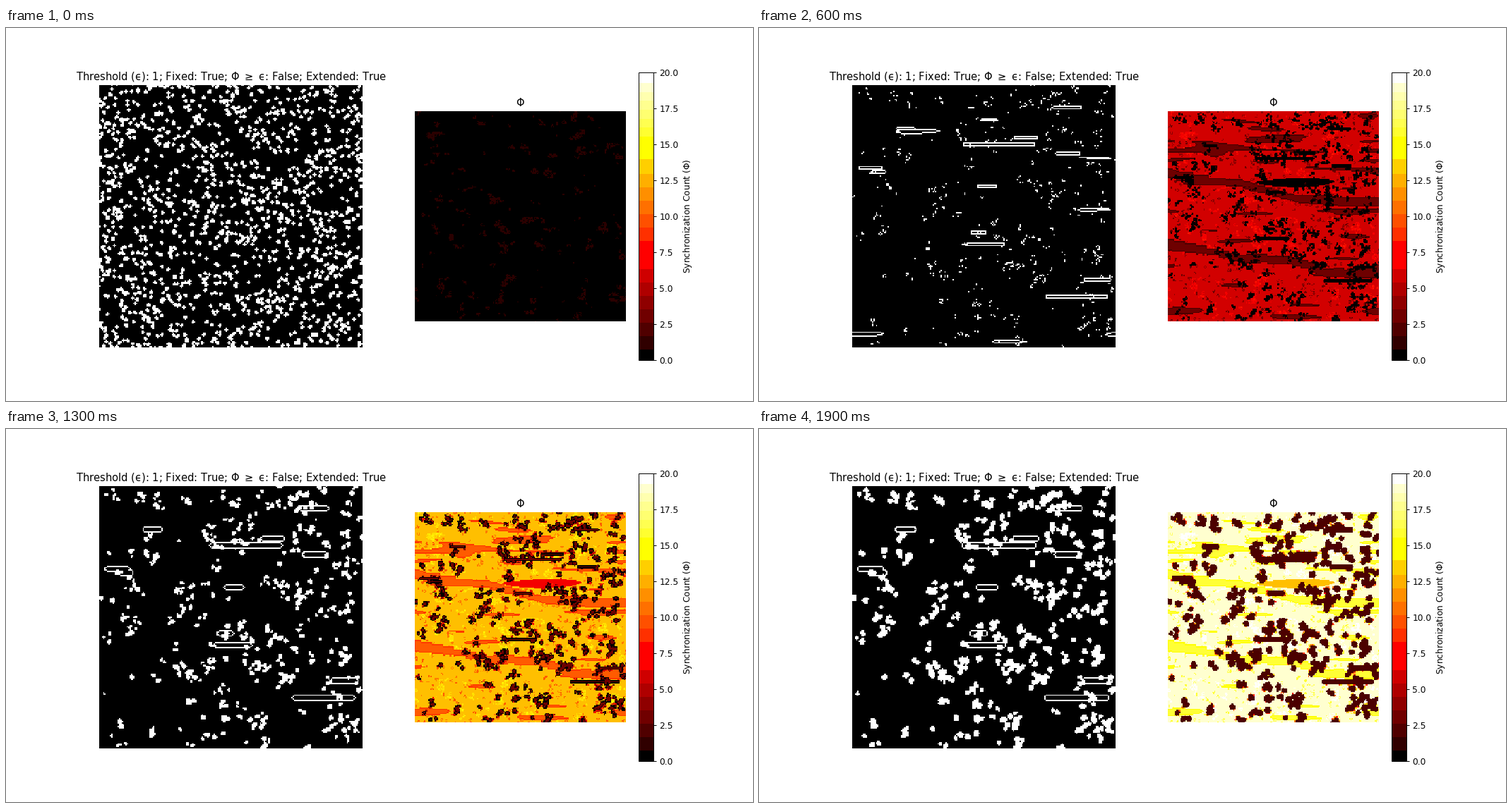
Animation, 1058 px wide and 529 px high, one loop 2000 ms. Source, as a matplotlib script:

```python
import numpy as np
import matplotlib.pyplot as plt
from matplotlib.animation import FuncAnimation
from matplotlib.cm import ScalarMappable
from matplotlib.colors import ListedColormap, Normalize

N = 200          # cells per side of the lattice
STEPS = 20
DPI = 1058 / 12

rng = np.random.default_rng(11)
yy, xx = np.mgrid[0:N, 0:N].astype(float)


def noise(sx, sy):
    """Periodic Gaussian noise with unit variance."""
    f = np.fft.fftfreq(N)
    kernel = np.exp(-2 * np.pi**2 * ((f * sx)**2 + (f[:, None] * sy)**2))
    a = np.fft.ifft2(np.fft.fft2(rng.normal(size=(N, N))) * kernel).real
    return (a - a.mean()) / a.std()


def edge(mask):
    sides = [np.roll(mask, s, axis) for s in (-1, 1) for axis in (0, 1)]
    return mask & ~np.logical_and.reduce(sides)


def drift_band(xs, ys, half):
    """Depth inside a long band that sinks to the right in steps."""
    centre = 2 * np.round(np.interp(xx, xs, ys) / 2)
    return half - np.abs(yy - centre)


def seed_dots(count):
    """Small round dots; each cell keeps the lowest score of its dots."""
    score = np.full((N, N), 9.0)
    weight = np.exp(0.3 * noise(5, 5)).ravel()
    for c in rng.choice(N * N, count, p=weight / weight.sum()):
        y, x = divmod(int(c), N)
        s = rng.random()
        for dy in (-1, 0, 1):
            for dx in (-1, 0, 1):
                if dx * dy == 0 or rng.random() < 0.35:
                    j, i = (y + dy) % N, (x + dx) % N
                    score[j, i] = min(score[j, i], s)
    return score


def spot_distance(clusters, singles):
    """Distance to small clumps of points, denser towards the right."""
    d = np.full((N, N), 99.0)
    for k in range(clusters + singles):
        x, y = N * rng.random()**0.85, N * rng.random()
        size = rng.integers(2, 5) if k < clusters else 1
        for ox, oy in rng.normal(0, 2.1, (size, 2)):
            r = np.hypot(xx - x - ox, yy - y - oy)
            np.minimum(d, r + rng.uniform(-0.2, 0.9), out=d)
    return d


def line_distance(count):
    """Distance to flat line defects: three long ones and random short ones."""
    lines = [(111, 45, 26), (170, 161, 22), (101, 121, 13)]
    lines += [(*rng.uniform(10, 190, 2), rng.uniform(4, 10))
              for _ in range(count)]
    return np.min([np.hypot(np.maximum(np.abs(xx - x) - half, 0),
                            yy - np.round(y)) for x, y, half in lines], axis=0)


dots = seed_dots(1400)
grain = rng.random((N, N))

# Bands that synchronise late
stripes = noise(15, 1.8)
core = 4.5 - np.hypot((xx - 122) / 9, yy - 68) + 0.4 * stripes
depth = np.maximum.reduce([
    (stripes - 1.3) * 6,
    drift_band((0, 70, 120, 200), (60, 69, 83, 87), 4) + 0.7 * stripes,
    drift_band((0, 68, 118, 150, 200), (126, 139, 143, 152, 155), 4.5)
    + 0.7 * stripes,
    core,
])

# Defects that never settle
spots = spot_distance(150, 90) + 0.3 * noise(0.7, 0.7)
lines = line_distance(9)
defects = np.minimum(spots, lines + 0.6)

# Steps each cell lags behind (or leads) the synchronised majority
slow = depth > 0
lag = 3.0 * slow + 1.0 * edge(slow)
lag[core > 0] = 6
specks = (dots < 0.5) & (grain < 0.6)
lag[specks] = np.maximum(lag[specks], np.floor(2 + 4 * dots[specks]))
halo = (defects < 4.2) & (noise(1.2, 1.2) > 0.75)
lag[halo] = np.floor(4 + 9 * grain[halo])
lead = (noise(3, 2.5) + 0.4 * noise(1, 1) > 1.6) & (grain < 0.75) & ~slow
lag[lead & ~halo] = -1
lag[lead & ~halo & (grain < 0.15)] = -2


def phi_at(t):
    if t == 0:
        return 1.0 * lead
    phi = np.maximum(t - lag, 0)
    radius = 1 + 0.12 * t
    inside = defects < radius
    rim = inside & (defects > radius - 1)
    phi[inside] = max(t - 17, 0) if t >= 17 else max(t - 10, 0)
    if t < 17:
        phi[rim] = 0
    return np.clip(phi, 0, 20)


def active_at(t):
    if t == 0:
        return dots < 2
    flicker = np.random.default_rng(100 + t).random((N, N))
    radius = 0.9 + 0.08 * t
    ring = np.abs(spots - radius) < 0.55
    # Defects pulse with a period of three steps
    if t % 3 == 2:
        on = ring & (flicker < 0.85)
    elif t % 3 == 1:
        on = spots < radius
    else:
        on = (spots < radius) & (spots > 0.5) & (flicker < 0.35 + 0.03 * t)
    on = on | (np.abs(lines - radius + 0.4) < 0.5)
    if t <= 6:
        on = on | edge(depth > 2 * (t - 3))
        on = on | ((dots < 1 - 0.18 * t) & (flicker < 0.7))
    return on


def posterise(colors):
    """Eight levels per channel, with pure ends."""
    level = np.minimum(np.floor(colors * 8), 7)
    mid = (level + 0.5) / 8
    return np.where(level == 0, 0, np.where(level == 7, 1, mid))


hot = plt.get_cmap("hot")(np.arange(256))[:, :3]
hot[0] = 0

fig, (left, right) = plt.subplots(1, 2, figsize=(1058 / DPI, 529 / DPI), dpi=DPI)
state = left.imshow(active_at(0), cmap="gray", vmin=0, vmax=1,
                    interpolation="nearest")
count = right.imshow(phi_at(0), cmap=ListedColormap(hot), vmin=0, vmax=20,
                     interpolation="nearest")
left.set_title("Threshold (ϵ): 1; Fixed: True; "
               r"$\Phi$ $\geq$ ϵ: False; Extended: True")
right.set_title(r"$\Phi$")
left.axis("off")
right.axis("off")
scale = ScalarMappable(Normalize(0, 20), ListedColormap(posterise(hot)))
fig.colorbar(scale, ax=right, label=r"Synchronization Count ($\Phi$)")


def update(t):
    state.set_data(active_at(t))
    count.set_data(phi_at(t))
    return state, count


anim = FuncAnimation(fig, update, frames=STEPS, interval=100, repeat=True,
                     repeat_delay=0, blit=False)
plt.show()
```
